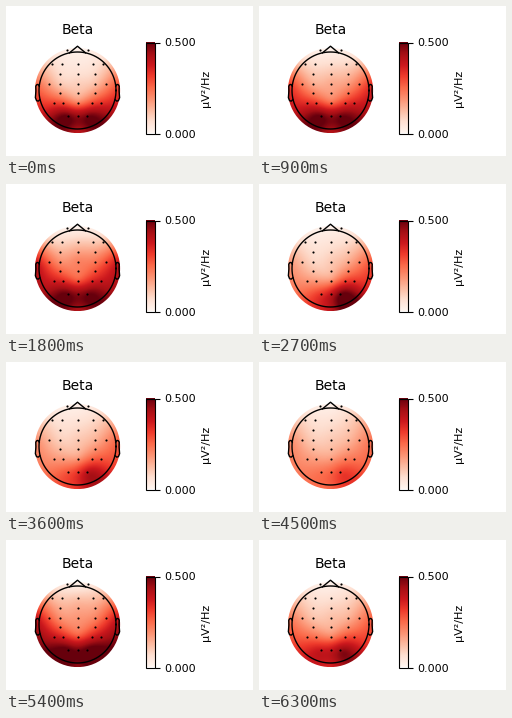
A matplotlib script for the animation above (7.2 s loop, 247 px wide and 150 px high).

```python
import numpy as np
import matplotlib.pyplot as plt
from matplotlib.animation import FuncAnimation
from matplotlib.patches import Circle, Rectangle

W, H, DPI = 247, 150, 100
CX, CY = 71.5, 84.5          # head centre in pixels
HEAD, DISC = 38.5, 42.6      # outline and colour disc radii
STEP_MS = 900

plt.rcParams["font.family"] = "DejaVu Sans"
fig = plt.figure(figsize=(W / DPI, H / DPI), dpi=DPI, facecolor="white")
ax = fig.add_axes([0, 0, 1, 1])
ax.set_xlim(0, W)
ax.set_ylim(H, 0)
ax.axis("off")

# Scalp anchors relative to the head centre, y pointing down
ANCHORS = np.array([
    (0, -40), (-26, -27), (26, -27), (0, -22),
    (-41, -4), (-18, -7), (0, -7), (18, -7), (41, -4),
    (-33, 20), (0, 11), (33, 20),
    (-12, 28), (12, 28), (0, 42),
], float)

# Band power at each anchor, in percent of the colour range
REST = [3, 14, 16, 9, 50, 20, 18, 24, 58, 72, 38, 80, 104, 102, 80]
STRONG = [3, 18, 22, 25, 76, 38, 42, 46, 78, 82, 52, 84, 104, 102, 84]
RIGHT = [3, 10, 18, 12, 36, 16, 20, 30, 58, 44, 34, 72, 66, 106, 80]
WEAK = [4, 14, 22, 13, 40, 19, 20, 26, 48, 42, 32, 52, 48, 64, 52]
PEAK = [4, 24, 28, 26, 78, 38, 36, 42, 80, 92, 52, 96, 108, 110, 92]
FADE = [3, 15, 20, 14, 46, 22, 23, 28, 54, 60, 38, 66, 78, 94, 72]


def mean(a, b):
    return np.add(a, b) / 2


STATES = [REST, mean(REST, STRONG), STRONG, RIGHT,
          mean(RIGHT, WEAK), WEAK, PEAK, FADE]


def kernel(a, b):
    """Thin-plate spline kernel between two point sets."""
    d2 = ((a[:, None] - b[None]) ** 2).sum(-1) / HEAD ** 2
    return d2 * np.log(d2 + 1e-12)


def affine(p):
    return np.column_stack([np.ones(len(p)), p / HEAD])


n = len(ANCHORS)
side = np.linspace(-DISC, DISC, 172)
grid = np.stack(np.meshgrid(side, side), -1).reshape(-1, 2)
poly = affine(ANCHORS)
system = np.block([[kernel(ANCHORS, ANCHORS), poly],
                   [poly.T, np.zeros((3, 3))]])
basis = np.hstack([kernel(grid, ANCHORS), affine(grid)])


def field(values):
    rhs = np.append(np.asarray(values, float) / 200, [0, 0, 0])
    return (basis @ np.linalg.solve(system, rhs)).reshape(len(side), -1)


topo = ax.imshow(field(STATES[0]), cmap="Reds", vmin=0, vmax=0.5,
                 extent=(CX - DISC, CX + DISC, CY + DISC, CY - DISC),
                 interpolation="bilinear", aspect="auto")
topo.set_clip_path(Circle((CX, CY), DISC, transform=ax.transData))


def outline(x, y):
    ax.plot(CX + HEAD * np.asarray(x), CY - HEAD * np.asarray(y),
            color="black", lw=1, zorder=3)


# Head, nose and ears
turn = np.linspace(0, 2 * np.pi, 101)
outline(np.cos(turn), np.sin(turn))
nose = np.deg2rad(12)
brow = np.sqrt(1 - nose ** 2)
outline([-nose, 0, nose], [brow, 1.15, brow])
ear_x = 2 * np.array([.497, .510, .518, .5299, .5419,
                      .54, .547, .532, .510, .489])
ear_y = 2 * np.array([.0555, .0775, .0783, .0746, .0555,
                      -.0055, -.0932, -.1313, -.1384, -.1199])
outline(ear_x, ear_y)
outline(-ear_x, ear_y)

# Sensors: row height and the columns in it
ROWS = [
    (43.8, [60.6, 82]),
    (58.4, [46, 56.4, 71.5, 87, 97]),
    (68, [54.2, 71.5, 89.2]),
    (78.2, [43, 54, 71.5, 89.4, 100.2]),
    (87.3, [54.2, 71.5, 89.2]),
    (97.4, [48, 57, 71.5, 86.3, 95.2]),
    (109.5, [62, 71.5, 80.8]),
]
for y, xs in ROWS:
    ax.scatter(xs, [y] * len(xs), s=2.4, c="black", lw=0, zorder=4)

ax.text(CX, 28, "Beta", fontsize=10, ha="center", va="baseline")

# Colour bar
LEFT, RIGHT_EDGE, TOP, BOTTOM = 139.5, 148.5, 36.5, 127.5
ax.imshow(np.linspace(1, 0, 256)[:, None], cmap="Reds", vmin=0, vmax=1,
          extent=(LEFT, RIGHT_EDGE, BOTTOM, TOP), aspect="auto")
ax.add_patch(Rectangle((LEFT, TOP), RIGHT_EDGE - LEFT, BOTTOM - TOP,
                       fill=False, ec="black", lw=0.8))
for y, label in [(TOP, "0.500"), (BOTTOM, "0.000")]:
    ax.plot([RIGHT_EDGE, 153.5], [y, y], color="black", lw=0.8,
            solid_capstyle="butt")
    ax.text(158, y, label, fontsize=8, va="center_baseline")
ax.text(200.3, 82, "\u00b5V\u00b2/Hz", fontsize=8, rotation=90,
        ha="center", va="center")


def update(i):
    topo.set_data(field(STATES[i]))
    return [topo]


anim = FuncAnimation(fig, update, frames=len(STATES), interval=STEP_MS,
                     repeat=True, repeat_delay=0)
plt.show()
```
